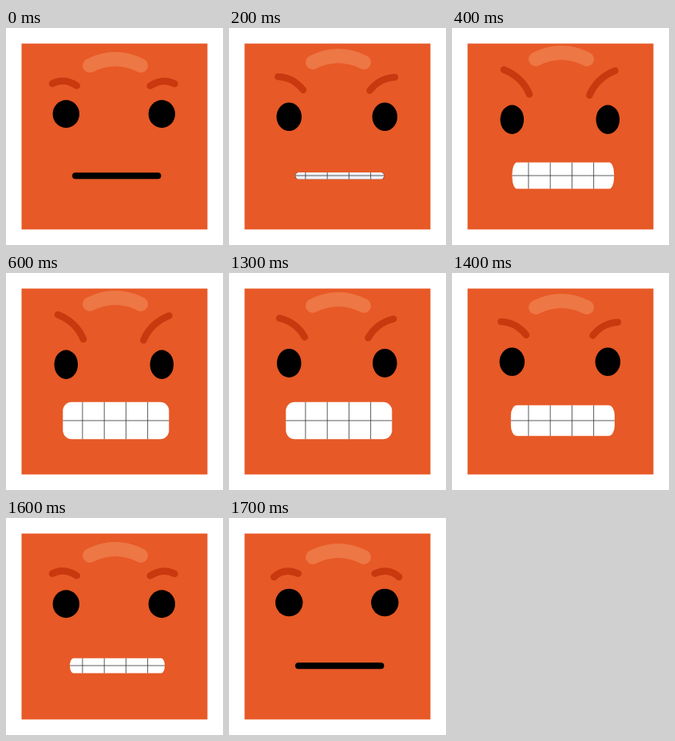
An HTML page for the animation above (1900 ms loop, 272x272 px).

```html
<!DOCTYPE html>
<html lang="en">
<head>
<meta charset="utf-8">
<title>Angry square</title>
<style>
  html, body { margin: 0; width: 100%; height: 100%; overflow: hidden; background: #fff; }
  svg { display: block; width: 100vw; height: 100vh; }
  .stroke { fill: none; stroke-linecap: round; }
</style>
</head>
<body>
<svg viewBox="0 0 272 272">
  <rect x="19.5" y="19.5" width="233" height="233" fill="#e75926"/>
  <path id="shine" class="stroke" d="M105 49Q137 33 169 49" stroke="#ed7745" stroke-width="18"/>
  <g class="stroke" stroke="#c9380e" stroke-width="8.6">
    <path id="browL"/>
    <path id="browR"/>
  </g>
  <ellipse id="eyeL" cx="75.3"/>
  <ellipse id="eyeR" cx="195.3"/>
  <path id="lips" class="stroke" d="M87 185.2H190.4" stroke="#000" stroke-width="8"/>
  <clipPath id="opening"><path id="mouth"/></clipPath>
  <g id="teeth" clip-path="url(#opening)">
    <rect id="enamel" x="65" y="155" width="145" height="60"/>
    <path d="M65 185H210M95.9 155V215M123.2 155V215M150.4 155V215M177.6 155V215"
          fill="none" stroke="#333" stroke-width=".8"/>
  </g>
</svg>
<script>
const LOOP = 1900;
const CLOSED = -1;

// start time, anger 0..1, mouth opening 0..1
const STEPS = [
  [0, .2, CLOSED], [100, .4, CLOSED], [200, .6, 0], [300, .8, .35],
  [400, 1, .65], [500, 1, .86], [600, 1, 1],
  [1300, .8, 1], [1400, .6, .79], [1500, .4, .54], [1600, .2, .27],
  [1700, 0, CLOSED]
];

const $ = id => document.getElementById(id);
const mix = (a, b, t) => a + (b - a) * t;
const set = (id, attrs) => {
  for (const name in attrs) $(id).setAttribute(name, attrs[name]);
};

function browPath(p) {
  const point = (x0, y0, x1, y1) => `${mix(x0, x1, p)} ${mix(y0, y1, p)}`;
  return `M${point(56.3, 74, 65, 52.3)}` +
    `Q${point(69, 62, 88, 61.5)} ${point(86.7, 69.6, 97, 83)}`;
}

function mouthPath(k) {
  const left = mix(83.3, 71.3, k);
  const right = mix(194.3, 204.3, 1 - (1 - k) ** 2);
  const top = mix(181, 161.7, k);
  const bottom = mix(189.4, 208.2, k);
  const rx = mix(4.2, 11, k ** 3);
  const ry = Math.min((bottom - top) / 2, 20 - 9 * k);
  const arc = (x, y) => `A${rx} ${ry} 0 0 1 ${x} ${y}`;
  return `M${left + rx} ${top}H${right - rx}${arc(right, top + ry)}` +
    `V${bottom - ry}${arc(right - rx, bottom)}` +
    `H${left + rx}${arc(left, bottom - ry)}V${top + ry}${arc(left + rx, top)}Z`;
}

function pose(anger, open) {
  set('shine', { transform: `translate(0 ${-10 * anger})` });
  const d = browPath(anger);
  set('browL', { d });
  set('browR', { d, transform: `translate(269.4 ${1.2 * anger}) scale(-1 1)` });
  for (const id of ['eyeL', 'eyeR']) {
    set(id, {
      cy: mix(106, 114.7, anger),
      rx: mix(17.2, 14.8, anger),
      ry: mix(17.2, 18.2, anger)
    });
  }
  const closed = open === CLOSED;
  set('teeth', { visibility: closed ? 'hidden' : 'visible' });
  if (closed) return;
  set('mouth', { d: mouthPath(open) });
  set('enamel', { fill: open ? '#fff' : '#f0f3fb' });
}

const start = performance.now();
let current;

function frame() {
  const time = (performance.now() - start) % LOOP;
  const step = STEPS.findLast(([from]) => from <= time);
  if (step !== current) {
    current = step;
    pose(step[1], step[2]);
  }
  requestAnimationFrame(frame);
}
frame();
</script>
</body>
</html>
```
